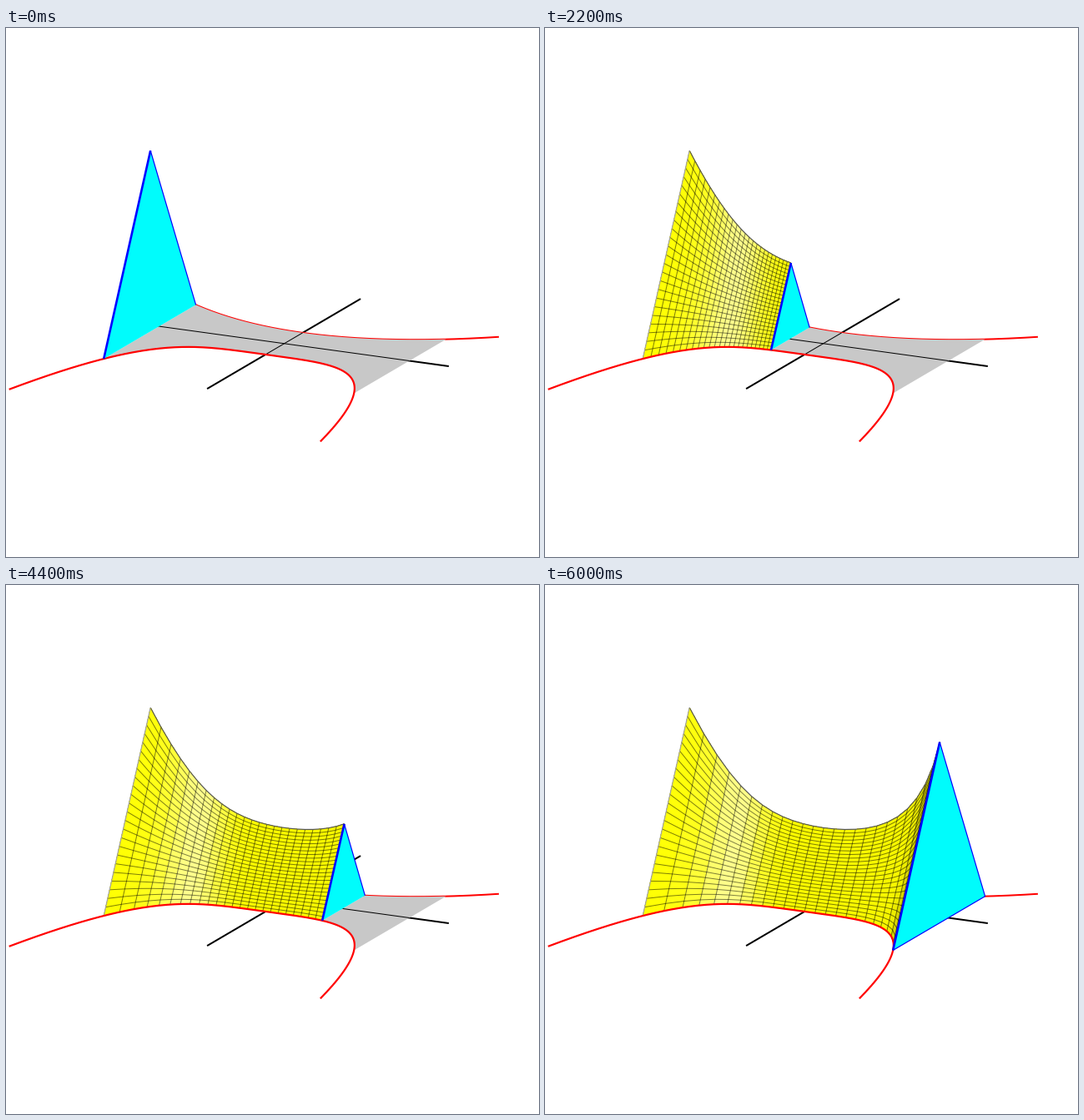
Animation, 639 px wide and 635 px high, one loop 6100 ms. Source, as a matplotlib script:

```python
import numpy as np
import matplotlib.pyplot as plt
from matplotlib.animation import FuncAnimation
from matplotlib.collections import LineCollection, PolyCollection
from matplotlib.patches import Polygon

W, H, DPI = 639, 635, 64
PX = 72 / DPI
FRAMES, INTERVAL = 61, 100
CELLS = 24

ORIGIN = np.array([333.6, 378.8])
X_DIR = np.array([150, 20.7])
Y_DIR = np.array([1, -0.587])
RISE = 1.97  # triangle height over base width


def back(t):
    return 22 + 22 * t**2


def front(t):
    return -22.4 - 44 * t**4


def ground(t, y):
    """Project points of the base plane onto the stage."""
    t, y = np.broadcast_arrays(t, y)
    return ORIGIN + t[..., None] * X_DIR + y[..., None] * Y_DIR


def ridge(t):
    t = np.asarray(t, float)
    top = ground(t, (back(t) + front(t)) / 2)
    top[..., 0] += 0.8
    top[..., 1] -= RISE * (back(t) - front(t))
    return top


def shade(t, v):
    """Yellow with a soft highlight band and a darker far end."""
    glow = 0.55 * np.exp(-((t + 0.58 + 0.08 * v) / 0.2) ** 2)
    dark = 1 - 0.03 * np.clip(t + 0.4, 0, 1) - 0.25 * np.clip((t - 0.75) / 0.25, 0, 1)
    return np.stack([dark, dark, glow], axis=-1)


fig = plt.figure(figsize=(W / DPI, H / DPI), dpi=DPI, facecolor="white")
ax = fig.add_axes([0, 0, 1, 1])
ax.set_xlim(0, W)
ax.set_ylim(H, 0)
ax.axis("off")


def stroke(points, color, width, z):
    points = np.asarray(points, float).reshape(-1, 2)
    line, = ax.plot(points[:, 0], points[:, 1], color=color, lw=width * PX,
                    zorder=z, solid_capstyle="butt", solid_joinstyle="round")
    return line


def fill(color, z):
    patch = Polygon(np.zeros((3, 2)), closed=True, fc=color, ec="none", zorder=z)
    ax.add_patch(patch)
    return patch


RED, BLUE = "#ff0000", "#0000ff"

# Axes and curves, partly covered by the floor
x_axis = ground(np.array([-1.315, 1.315]), 0)
y_axis = ground(0, np.array([-92.5, 91.5]))
stroke(x_axis, "black", 2, 1)
stroke(y_axis, "black", 2, 1)
rear = np.linspace(-1.315, 1.315, 200)
stroke(ground(rear, back(rear)), RED, 2, 1)
near = np.linspace(-1.275, 1.315, 240)
stroke(ground(near, front(near)), RED, 2.2, 6)

floor = fill("#c8c8c8", 2)
thin_x = stroke(np.zeros((2, 2)), "black", 1, 3)
thin_y = stroke(ground(0, np.array([-22, 22])), "black", 1, 3)

skin = PolyCollection([], edgecolors="none", antialiaseds=False, zorder=4)
mesh = LineCollection([], colors=[(0, 0, 0, 0.5)], linewidths=PX, zorder=5)
ax.add_collection(skin, autolim=False)
ax.add_collection(mesh, autolim=False)
rim = stroke(np.zeros((2, 2)), "#555555", 1.2, 5)
side = stroke(np.zeros((2, 2)), "#a0a0a0", 1.2, 5)

slab = fill("#00fcfc", 7)
thin_edge = stroke(np.zeros((2, 2)), BLUE, 1.2, 8)
thick_edge = stroke(np.zeros((2, 2)), BLUE, 2.6, 9)


def draw_skin(t):
    ts = np.linspace(-1, t, CELLS + 1)
    vs = np.linspace(0, 1, CELLS + 1)
    low, top = ground(ts, front(ts)), ridge(ts)
    grid = low[:, None] + vs[None, :, None] * (top - low)[:, None]
    quads = np.stack([grid[:-1, :-1], grid[1:, :-1], grid[1:, 1:], grid[:-1, 1:]], axis=2)
    skin.set_verts(quads.reshape(-1, 4, 2))
    tm, vm = np.meshgrid((ts[:-1] + ts[1:]) / 2, (vs[:-1] + vs[1:]) / 2, indexing="ij")
    skin.set_facecolor(shade(tm, vm).reshape(-1, 3))
    rows = [grid[:, j] for j in range(1, CELLS)]
    columns = [grid[i] for i in range(1, CELLS)]
    mesh.set_segments(rows + columns)
    rim.set_data(*top.T)
    side.set_data(*grid[0].T)


def update(frame):
    t = -1 + 2 * frame / (FRAMES - 1)
    started, done = frame > 0, frame == FRAMES - 1

    ts = np.linspace(t, 1, 120)
    floor.set_xy(np.vstack([ground(ts, front(ts)), ground(ts, back(ts))[::-1]]))
    floor.set_visible(not done)
    thin_x.set_data(*ground(np.array([t, 1]), 0).T)
    thin_y.set_visible(t < 0)

    for part in (skin, mesh, rim, side):
        part.set_visible(started)
    if started:
        draw_skin(t)

    left, right, top = ground(t, front(t)), ground(t, back(t)), ridge(t)
    slab.set_xy([left, right, top])
    edge = [top, right, left] if done else [top, right]
    thin_edge.set_data(*np.array(edge).T)
    thick_edge.set_data(*np.array([left, top]).T)
    return []


anim = FuncAnimation(fig, update, frames=FRAMES, interval=INTERVAL,
                     init_func=lambda: update(0), repeat=True, repeat_delay=0)
plt.show()
```
